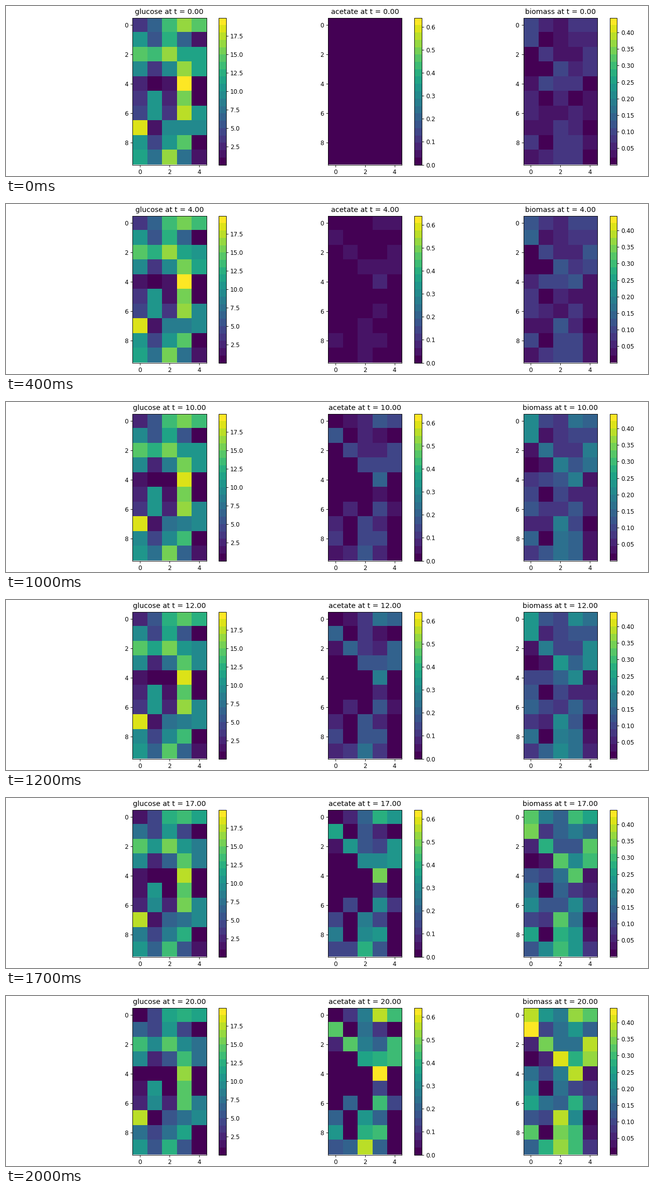
Animation, 1280 px wide and 341 px high, one loop 2100 ms. Source, as a matplotlib script:

```python
import numpy as np
import matplotlib.pyplot as plt
from matplotlib.animation import FuncAnimation

W, H, DPI = 1280, 341, 64
STEPS, SUB = 21, 20
K = 4 / 3  # point scale: a 15-inch wide layout on a 20-inch figure

plt.rcParams.update({
    "font.family": "DejaVu Sans",
    "font.size": 10 * K,
    "axes.titlesize": 12 * K,
    "axes.titlepad": 6 * K,
    "axes.linewidth": 0.8 * K,
    "xtick.major.size": 3.5 * K, "ytick.major.size": 3.5 * K,
    "xtick.major.width": 0.8 * K, "ytick.major.width": 0.8 * K,
    "xtick.major.pad": 3.5 * K, "ytick.major.pad": 3.5 * K,
})

# Starting concentrations on the 10 x 5 grid
GLUCOSE = np.array([
    [3.95, 6.6, 13.7, 16.1, 14.1],
    [10.9, 5.3, 12.2, 6.6, 1.1],
    [14.4, 13.05, 16.45, 11.4, 11.2],
    [9.5, 3.1, 9.6, 16.05, 11.4],
    [2.1, 0.15, 1.35, 19.97, 0.25],
    [3.4, 10.6, 2.05, 15.3, 0.5],
    [4.6, 10.8, 3.4, 17.2, 10.1],
    [18.7, 1.85, 9.1, 9.15, 9.6],
    [10.3, 4.4, 10.8, 14.7, 0.2],
    [11.4, 7.9, 16.3, 7.9, 1.6],
])
BIOMASS = np.array([
    [0.098, 0.053, 0.041, 0.082, 0.071],
    [0.0995, 0.021, 0.039, 0.053, 0.055],
    [0.0125, 0.0765, 0.037, 0.037, 0.089],
    [0.004, 0.0125, 0.093, 0.061, 0.082],
    [0.041, 0.090, 0.070, 0.088, 0.020],
    [0.051, 0.001, 0.046, 0.0225, 0.030],
    [0.061, 0.037, 0.033, 0.061, 0.0275],
    [0.028, 0.028, 0.088, 0.047, 0.002],
    [0.071, 0.002, 0.078, 0.068, 0.023],
    [0.033, 0.061, 0.081, 0.068, 0.0225],
])


def simulate():
    """Monod growth on glucose with acetate overflow at high uptake."""
    g, b = GLUCOSE.copy(), BIOMASS.copy()
    a = np.zeros_like(g)
    states = []
    for _ in range(STEPS):
        states.append((g.copy(), a.copy(), b.copy()))
        for _ in range(SUB):
            grown = 0.0765 * g / (0.2 + g) * b / SUB
            grown = np.minimum(grown, g / 12)
            overflow = np.maximum(0, g / (0.5 + g) - 0.893)
            a += 26 * overflow * grown
            b += grown
            g = np.maximum(0, g - 12 * grown)
    return states


def box(x, y, w, h):
    """Pixel box, measured from the top left, as figure fractions."""
    return [x / W, 1 - (y + h) / H, w / W, h / H]


PANELS = [
    ("glucose", 252.0, 0.03, 19.97, np.arange(2.5, 18, 2.5), "%.1f"),
    ("acetate", 641.75, 0.0, 0.641, np.arange(7) * 0.1, "%.1f"),
    ("biomass", 1031.5, 0.0003, 0.4444, np.arange(1, 9) * 0.05, "%.2f"),
]
TOP, CELL = 23.5, 29.5

states = simulate()
fig = plt.figure(figsize=(W / DPI, H / DPI), dpi=DPI, facecolor="white")
cmap = plt.get_cmap("viridis", 20)
images = []
for (name, x, lo, hi, ticks, fmt), data in zip(PANELS, states[0]):
    ax = fig.add_axes(box(x, TOP, 5 * CELL, 10 * CELL))
    im = ax.imshow(data, cmap=cmap, vmin=lo, vmax=hi,
                   interpolation="nearest", aspect="auto")
    ax.set_xticks([0, 2, 4])
    ax.set_yticks([0, 2, 4, 6, 8])
    cax = fig.add_axes(box(x + 172, TOP, CELL / 2, 10 * CELL))
    fig.colorbar(im, cax=cax, ticks=ticks, format=fmt)
    images.append(im)


def update(i):
    for panel, im, data in zip(PANELS, images, states[i]):
        im.set_data(data)
        im.axes.set_title(f"{panel[0]} at t = {i:.2f}")
    return images


anim = FuncAnimation(fig, update, frames=STEPS, interval=100,
                     repeat=True, repeat_delay=0, blit=False)
plt.show()
```
